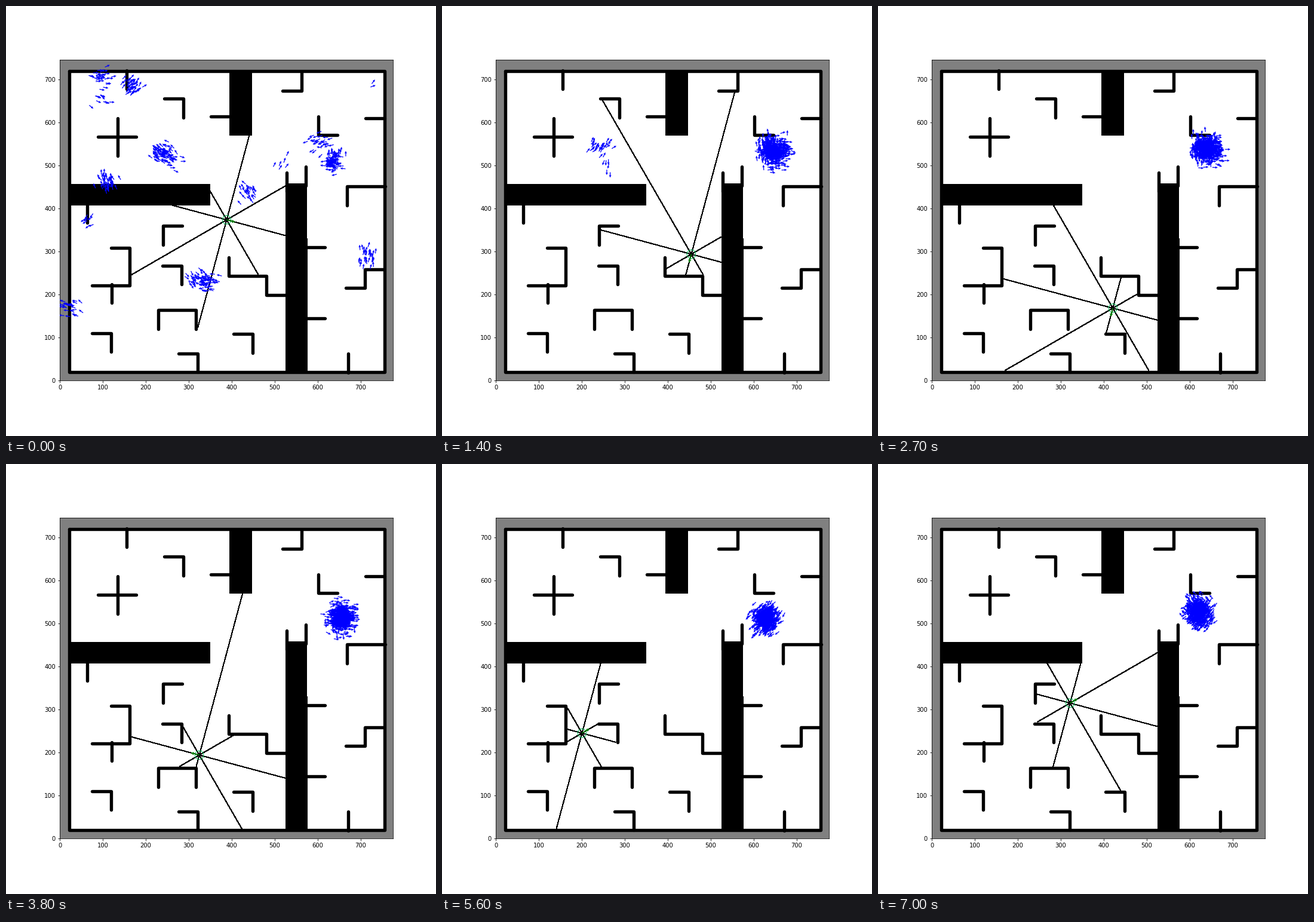
Recreate the animation shown at these times as a matplotlib script. Size 720 by 720 pixels, loop 7100 ms.

```python
import numpy as np
import matplotlib.pyplot as plt
from matplotlib.animation import FuncAnimation
from matplotlib.collections import LineCollection
from matplotlib.patches import Circle, Rectangle

# Scene units are pixel centres, y pointing down; 100 map units are 72 pixels.
LEFT, RIGHT, TOP, BOTTOM = 89.5, 647.5, 89.2, 626.3
FRAMES, INTERVAL = 71, 100
WALL, ARM = 5.4, 31.7
STEPS = {"U": (0, -ARM), "D": (0, ARM), "L": (-ARM, 0), "R": (ARM, 0)}

# Each wall starts at a point and follows arms of equal length.
WALLS = {
    "D": [(201, 107), (135, 331), (176.4, 465)],
    "U": [(469.7, 310), (501.6, 300), (572, 613)],
    "L": [(374, 184.7), (633, 187)],
    "R": [(502, 403.2), (502, 522.2)],
    "RD": [(264.5, 154.7), (261.5, 434), (143.7, 547), (288.7, 581), (380.3, 548.6)],
    "DL": [(494.3, 110)],
    "DR": [(522.7, 184)],
    "LD": [(294.5, 367.5)],
    "DD": [(186.2, 187)],
    "RR": [(153.7, 218.6)],
    "LLD": [(634, 301.5)],
    "LDL": [(632, 440)],
    "URRD": [(254.5, 540.5)],
    "RDDLL": [(175, 404)],
    "DRRDR": [(372.4, 420)],
}

# Solid blocks: x0, y0, x1, y1.
BLOCKS = [(104, 297, 341, 333), (373, 108, 411.5, 216),
          (467, 296.5, 503, 390), (467, 388, 504.5, 613)]

# Robot legs: heading in degrees, frames, pixels per frame.
LEGS = [(-15, 8, 7.65), (-105, 19, 7.2), (165, 24, 7.2), (75, 1, 7.2), (30, 15, 7.2)]

# Early guesses in order of heading: x, y, count.
GUESSES = [
    (318, 454, 35), (156, 157, 12), (272, 257, 22), (156, 119, 28), (607, 123, 2),
    (209, 138, 45), (458, 268, 6), (604, 422, 34), (169, 299, 45), (405, 314, 25),
    (265, 246, 68), (106, 502, 32), (342, 464, 42), (527, 226, 28), (140, 360, 9),
    (550, 262, 95),
]
LASTING = (2, 10)
MAIN = len(GUESSES) - 1

# Main cloud: frame, x, y, share of the side group.
CLOUD = np.array([(0, 550, 262, 0.3), (14, 549, 245, 0.5), (27, 546, 242, 0.3),
                  (38, 557, 256, 0.05), (56, 545, 255, 0), (70, 542, 249, 0.3)])


def trace(start, route):
    return np.cumsum([start] + [STEPS[s] for s in route], axis=0)


def robot_path():
    x, y = 369, 357.5
    poses = [(x, y, LEGS[0][0])]
    for n, (heading, count, size) in enumerate(LEGS):
        if n > 1:  # a sharp turn takes one frame on the spot
            poses.append((x, y, heading))
        a = np.radians(heading)
        for _ in range(count):
            x += size * np.cos(a)
            y -= size * np.sin(a)
            poses.append((x, y, heading))
    return np.array(poses)


def wall_boxes():
    boxes = list(BLOCKS)
    for line in LINES:
        for a, b in zip(line, line[1:]):
            boxes.append((*(np.minimum(a, b) - WALL / 2),
                          *(np.maximum(a, b) + WALL / 2)))
    return np.array(boxes)


def cast(pos, angle):
    """End point of a beam at the first wall it meets."""
    d = np.array([np.cos(angle), -np.sin(angle)])
    t0, t1 = (BOXES[:, :2] - pos) / d, (BOXES[:, 2:] - pos) / d
    near = np.minimum(t0, t1).max(axis=1)
    far = np.maximum(t0, t1).min(axis=1)
    return pos + d * near[(near <= far) & (near > 0)].min()


ROOM = np.array([(105, 108), (633, 108), (633, 612.5), (105, 612.5), (105, 108)])
LINES = [ROOM] + [trace(p, route) for route, starts in WALLS.items() for p in starts]
BOXES = wall_boxes()
PATH = robot_path()
TURN = np.radians(PATH[:, 2] - PATH[0, 2])
TRAVEL = np.cumsum(np.exp(1j * TURN)) - 1

rng = np.random.default_rng(7)
gx, gy, counts = np.array(GUESSES).T
home = np.repeat(np.arange(len(GUESSES)), counts)
N = len(home)
lasting = np.isin(home, LASTING)
speed = np.where(lasting, 1, 6)
life = np.where(lasting, rng.uniform(4, 20, N),
                np.minimum(1 + rng.exponential(2.5, N), 8))
life[home == MAIN] = 0
base = rng.normal(size=(2, N))
side_rank = rng.random(N)
home_angle = np.radians(np.linspace(-50, 240, MAIN + 1))[home]
home_noise = np.radians(rng.normal(0, 13, N))


def particles(i):
    """Tails and headings: early guesses first, then the main cloud."""
    r = np.random.default_rng(500 + i)
    x, y, share = (np.interp(i, CLOUD[:, 0], col) for col in CLOUD.T[1:])
    grow = min(1, 0.6 + i / 20)
    jx, jy = 0.8 * base + 0.6 * r.normal(size=(2, N))
    side = side_rank < share
    aim = np.radians(PATH[i, 2] + 195 - 90 * side)
    px = x + 9.8 * grow * jx + 8 * side * np.cos(aim)
    py = y + 11 * grow * jy - 8 * side * np.sin(aim)
    heading = aim + np.radians(r.normal(0, 11, N))

    early = life > i
    moved = np.exp(1j * home_angle) * TRAVEL[i] * speed
    px = np.where(early, gx[home] + 8 * base[0] + moved.real, px)
    py = np.where(early, gy[home] + 8 * base[1] - moved.imag, py)
    heading = np.where(early, home_angle + home_noise + TURN[i], heading)
    return px, py, heading


fig = plt.figure(figsize=(10, 10), dpi=72, facecolor="white")
ax = fig.add_axes([(LEFT + 0.5) / 720, 1 - (BOTTOM + 0.5) / 720,
                   (RIGHT - LEFT) / 720, (BOTTOM - TOP) / 720])
ax.set_facecolor("#808080")
marks = np.arange(8)
labels = [str(100 * m) for m in marks]
ax.set_xticks(LEFT + 72 * marks, labels, fontsize=10)
ax.set_yticks(BOTTOM - 72 * marks, labels, fontsize=10)

ax.add_patch(Rectangle(ROOM[0], *(ROOM[2] - ROOM[0]), color="white", lw=0, zorder=0.5))
for x0, y0, x1, y1 in BLOCKS:
    ax.add_patch(Rectangle((x0, y0), x1 - x0, y1 - y0, color="black", lw=0))
for line in LINES:
    ax.plot(*line.T, color="black", lw=WALL, zorder=1.5,
            solid_capstyle="round", solid_joinstyle="round")

beams = ax.add_collection(
    LineCollection([], colors="black", linewidths=1, antialiaseds=False, zorder=3),
    autolim=False)
body = ax.add_patch(Circle((0, 0), 7.2, fill=False, ec="#10c060", lw=1.1, zorder=5))


def arrows(n, color, width, zorder):
    zero = np.zeros(n)
    return ax.quiver(zero, zero, zero + 1, zero, color=color, units="dots",
                     scale_units="dots", scale=1, width=width, headwidth=3.2,
                     headlength=3.4, headaxislength=3, zorder=zorder)


swarm = arrows(N, "blue", 1.25, 4)
nose = arrows(1, "green", 1.7, 6)
ax.set_xlim(LEFT, RIGHT)
ax.set_ylim(BOTTOM, TOP)


def point(quiver, x, y, heading, length):
    quiver.set_offsets(np.column_stack([x, y]))
    quiver.set_UVC(length * np.cos(heading), length * np.sin(heading))


def update(i):
    x, y, degrees = PATH[i]
    heading = np.radians(degrees)
    pos = np.array([x, y])
    beams.set_segments([[pos, cast(pos, heading + k * np.pi / 4)]
                        for k in range(8)])
    body.center = (x, y)
    point(nose, [x], [y], np.array([heading]), 15)
    point(swarm, *particles(i), 9)
    return beams, body, nose, swarm


anim = FuncAnimation(fig, update, frames=FRAMES, interval=INTERVAL,
                     repeat=True, repeat_delay=0, blit=False)
plt.show()
```
